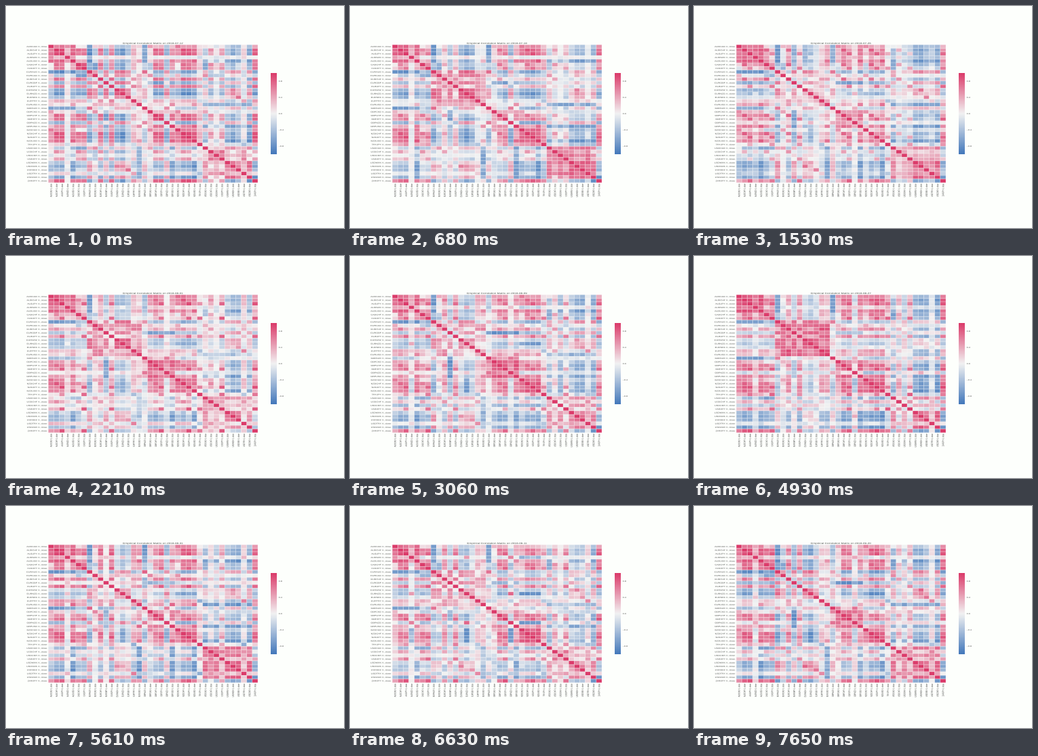
A matplotlib script that plays this animation: 498 px wide and 328 px high, repeating every 7.82 s.

```python
import matplotlib.pyplot as plt
import numpy as np
from matplotlib.animation import FuncAnimation
from matplotlib.colors import LinearSegmentedColormap
from matplotlib.patches import PathPatch
from matplotlib.textpath import TextPath
from matplotlib.transforms import Affine2D

W, H, DPI = 498, 328, 100
FRAMES, STEP = 46, 170
LEFT, RIGHT, TOP, BOTTOM = 62.3, 371, 57.2, 261
SX, SY = 1.24, 0.81  # the whole plot is wider than it is tall
TICK, TITLE = 3.02, 3.75
INK = "0.25"
PX = 72 / DPI
SAMPLES = 60

QUOTES = {
    "AUD": "CAD CHF JPY NZD USD",
    "CAD": "CHF JPY",
    "EUR": "AUD CAD CHF GBP JPY NOK NZD SEK TRY USD",
    "GBP": "AUD CAD CHF JPY NZD USD",
    "NZD": "CAD CHF JPY USD",
    "TRY": "JPY",
    "USD": "CAD CHF CNH JPY MXN NOK SEK TRY ZAR",
    "ZAR": "JPY",
}
PAIRS = [(base, q) for base, quotes in QUOTES.items() for q in quotes.split()]
N = len(PAIRS)

# Currencies from risk-seeking to safe haven
RISK = "AUD ZAR NZD NOK GBP SEK MXN CAD EUR CNH USD TRY CHF JPY".split()
# The currency that moves most in each stretch of the loop
LEADERS = "AUD JPY GBP USD AUD TRY GBP".split()
BASE = [RISK.index(b) for b, _ in PAIRS]
QUOTE = [RISK.index(q) for _, q in PAIRS]


def correlation(day):
    """Correlation matrix of one day of simulated pair returns."""
    rng = np.random.default_rng(day)
    load = np.linspace(0.8, -0.8, len(RISK)) + rng.normal(0, 0.12, len(RISK))
    vol = rng.lognormal(-0.6, 0.25, len(RISK))
    vol[RISK.index(LEADERS[day * len(LEADERS) // FRAMES])] *= 2
    market = rng.standard_normal((SAMPLES, 1))
    moves = market * load + vol * rng.standard_normal((SAMPLES, len(RISK)))
    noise = 0.35 * rng.standard_normal((SAMPLES, N))
    return np.corrcoef((moves[:, BASE] - moves[:, QUOTE] + noise).T)


def heading(day):
    date = np.busday_offset("2018-07-12", day * 10 // 9)
    return f"Empirical Correlation Matrix on {date}"


def outline(text, x, y, size=TICK, align=0.0, turn=0):
    """Text outline in pixels; align 0, 0.5 or 1 puts start, middle or end at x."""
    path = TextPath((0, 0), text, size=10, prop={"family": "Liberation Sans"})
    box = path.get_extents()
    shift = Affine2D().translate(-box.x0 - align * box.width, -3.6)
    place = shift.scale(size / 10).rotate_deg(turn).scale(SX, -SY).translate(x, y)
    return path.transformed(place)


def write(*args, **kwargs):
    return ax.add_patch(PathPatch(outline(*args, **kwargs), fc=INK, ec="none", lw=0))


def middles(edges):
    return (edges[:-1] + edges[1:]) / 2


cmap = LinearSegmentedColormap.from_list("div", ["#4479bb", "#f2f2f2", "#db3b6a"])

fig = plt.figure(figsize=(W / DPI, H / DPI), dpi=DPI, facecolor="#fdfffc")
ax = fig.add_axes([0, 0, 1, 1])
ax.axis("off")

xs = np.linspace(LEFT, RIGHT, N + 1)
ys = np.linspace(TOP, BOTTOM, N + 1)
mesh = ax.pcolormesh(xs, ys, correlation(0), cmap=cmap, vmin=-1, vmax=1,
                     edgecolors=(1, 1, 1, 0.4), linewidth=0.6 * PX,
                     antialiased=True, snap=False)

for (base, quote), x, y in zip(PAIRS, middles(xs), middles(ys)):
    label = f"{base}{quote} X, close"
    write(label, 60.3, y, align=1)
    write(label, x, 262.6, align=1, turn=90)

ax.imshow(np.linspace(1, -1, 256)[:, None], cmap=cmap, vmin=-1, vmax=1,
          extent=(390.3, 399.3, 218.6, 99), aspect="auto")
for value in np.linspace(0.8, -0.8, 5):
    write(f"{value:.1f}".replace("-", "\u2212"), 401.8, 159 - 60 * value)

title = write(heading(0), 216.6, 55, size=TITLE, align=0.5)
ax.set_xlim(0, W)
ax.set_ylim(H, 0)


def update(day):
    mesh.set_array(correlation(day))
    title.set_path(outline(heading(day), 216.6, 55, size=TITLE, align=0.5))
    return mesh, title


anim = FuncAnimation(fig, update, frames=FRAMES, interval=STEP,
                     repeat=True, repeat_delay=0)
plt.show()
```
